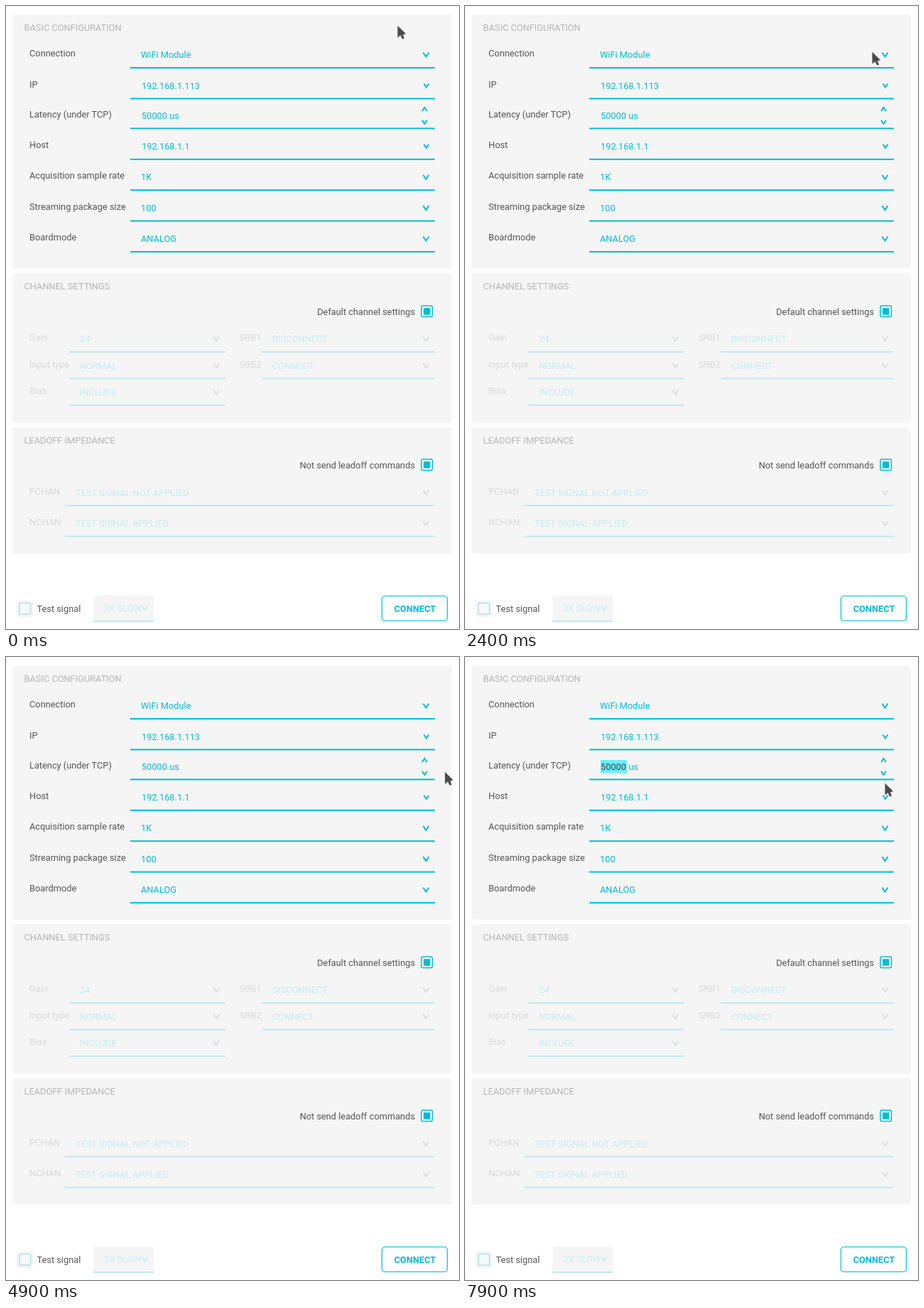
An HTML page for the animation above (8000 ms loop, 638x877 px).

```html
<!DOCTYPE html>
<html lang="en">
<head>
<meta charset="utf-8">
<title>Configuration panel</title>
<style>
html, body { margin: 0; width: 100%; height: 100%; overflow: hidden; background: #fff; }
svg { display: block; width: 638px; height: 877px; font: 12.8px Roboto, sans-serif; }
text { white-space: pre; }
</style>
</head>
<body>
<svg viewBox="0 0 638 877">
  <g id="form"></g>
  <g id="selection">
    <rect x="191" y="145" width="37" height="18" fill="#66efff"/>
    <text x="191" y="159" fill="#444">50000</text>
  </g>
  <rect id="ipCaret" x="274" y="104" width="1" height="15" fill="#00bcd4"/>
  <rect id="latencyCaret" x="192" y="146" width="1" height="17" fill="#00bcd4"/>
  <g id="connectionMenu">
    <rect x="175.5" y="9.5" width="428" height="95" fill="#f5f5f5" stroke="#dedede"/>
    <rect x="186" y="61" width="407" height="34" fill="#66efff"/>
    <path d="M193.5 78l2.5 3 5-6" fill="none" stroke="#444" stroke-width="1.8"/>
    <text x="217" y="41" fill="#555">Nelvaro (Serial)</text>
    <text x="217" y="83" fill="#444">WiFi Module</text>
  </g>
  <g id="ipMenu">
    <rect x="176" y="131" width="427" height="30" fill="#f5f5f5" stroke="#e2e2e2" stroke-width="2"/>
    <rect x="182" y="137.5" width="415" height="17.5" fill="#66efff" stroke="#3fd0e2"/>
    <text x="184" y="151" fill="#444">192.168.1.113</text>
  </g>
  <g id="pointer">
    <path d="M1 1V18L5 15 8 20 10 19 9 14 12 12Z" opacity=".12"/>
    <path d="M0 0V17L4 13.500 6.500 19 9.500 18 7.500 13 11.500 11.500Z" fill="#4a4a4a" stroke="#fff" paint-order="stroke"/>
  </g>
</svg>
<script>
const CYAN = '#00bcd4', PALE = '#c3ebf0', PALE_LINE = '#bfe9ee', PANEL = '#f5f5f5', INK = '#555';
const byId = id => document.getElementById(id);

const text = (x, y, s, fill, extra = '') =>
  `<text x="${x}" y="${Math.round(y)}" fill="${fill}" ${extra}>${s}</text>`;
const rect = (x, y, w, h, attrs) => `<rect x="${x}" y="${y}" width="${w}" height="${h}" ${attrs}/>`;
const chevron = (x, y, color, size = 1, flip = 1) =>
  `<path d="M${x - 4 * size} ${y - 3 * size * flip}l${4 * size} ${6 * size * flip} ${4 * size} ${-6 * size * flip}"
    fill="none" stroke="${color}" stroke-width="2"/>`;
const underline = (x1, x2, y, color) => rect(x1, y - 1, x2 - x1, 2, `fill="${color}"`);
const panel = (y, h, title) => rect(9, y, 619, h, `rx="4" fill="${PANEL}"`) + text(25.5, y + 23, title, '#b5b5b5');

const arrows = {
  combo: (y, color) => chevron(591.5, y, color),
  edit: (y, color) => chevron(592, y, color, .87),
  spin: (y, color) => chevron(589.5, y - 8.5, color, .87, -1) + chevron(589.5, y + 9.5, color, .87)
};

// All parts of a field hang from its underline.
function field(label, value, { labelX = 33, x1, x2 = 604, y, kind = 'combo', enabled = false }) {
  const valueX = x1 + (kind === 'combo' ? 15 : 16);
  return text(labelX, y - 15.8, label, enabled ? INK : '#d8d8d8') +
    text(valueX, y - 13.8, value, enabled ? CYAN : PALE) +
    underline(x1, x2, y, enabled ? CYAN : PALE_LINE) +
    `<g transform="translate(${x2 - 604} 0)">${arrows[kind](y - 18.5, enabled ? CYAN : '#dcdcdc')}</g>`;
}

const checkRow = (label, y) =>
  text(576, y + 4.5, label, INK, 'text-anchor="end"') +
  rect(585, y - 8, 15.5, 15.5, `rx="2" fill="#fff" stroke="${CYAN}" stroke-width="1.5"`) +
  rect(588, y - 4.8, 9.5, 9.5, `fill="${CYAN}"`);

let form = panel(12, 358, 'BASIC CONFIGURATION');
let y = 87;
[
  ['Connection', 'WiFi Module'],
  ['IP', '192.168.1.113', 'edit'],
  ['Latency (under TCP)', '50000 us', 'spin'],
  ['Host', '192.168.1.1', 'edit'],
  ['Acquisition sample rate', '1K'],
  ['Streaming package size', '100'],
  ['Boardmode', 'ANALOG']
].forEach(([label, value, kind = 'combo'], i) => {
  if (i) y += kind === 'spin' ? 42 : 43.4;
  form += field(label, value, { x1: 175, y, kind, enabled: true });
});

form += panel(376, 211, 'CHANNEL SETTINGS') + checkRow('Default channel settings', 430);
const channelY = row => 487 + 37.5 * row;
[['Gain', '24'], ['Input type', 'NORMAL'], ['Bias', 'INCLUDE']].forEach(([label, value], i) => {
  form += field(label, value, { x1: 89, x2: 309, y: channelY(i) });
});
[['SRB1', 'DISCONNECT'], ['SRB2', 'CONNECT']].forEach(([label, value], i) => {
  form += field(label, value, { labelX: 329, x1: 360, y: channelY(i) });
});

form += panel(593, 178, 'LEADOFF IMPEDANCE') + checkRow('Not send leadoff commands', 646);
[['PCHAN', 'TEST SIGNAL NOT APPLIED'], ['NCHAN', 'TEST SIGNAL APPLIED']].forEach(([label, value], i) => {
  form += field(label, value, { x1: 83, y: 703.3 + 43.4 * i });
});

form += rect(15, 837, 23, 23, 'rx="3" fill="#f4f4f4"') +
  rect(19, 840.5, 15.5, 15.5, 'rx="2" fill="#f8f8f8" stroke="#b0e2e8" stroke-width="1.5"') +
  text(43.5, 853, 'Test signal', INK) +
  rect(123, 829.5, 85, 36.5, `rx="4" fill="${PANEL}"`) +
  underline(123, 208, 866, PALE_LINE) +
  text(138, 852, '2X SLOW', '#c8edf1') +
  chevron(195.5, 847.5, '#c8edf1') +
  rect(529.5, 830.5, 92, 35, `rx="4" fill="#fff" stroke="${CYAN}" stroke-width="1.2"`) +
  text(576, 853, 'CONNECT', CYAN, 'text-anchor="middle" font-weight="700"');
byId('form').innerHTML = form;

const LOOP = 8000, TICK = 100;
const clamp = v => Math.min(1, Math.max(0, v));
// Share of a change that begins at `start` and is complete after `ticks` hard steps.
const progress = (t, start, ticks) => clamp((Math.floor((t - start) / TICK) + 1) / ticks);
const during = (t, start, end) => Number(t >= start && t < end);

const moves = [
  { start: 600, ticks: 2, to: [573, 64] },
  { start: 2900, ticks: 2, to: [584, 112] },
  { start: 3500, ticks: 2, to: [601, 104] },
  { start: 4500, ticks: 2, to: [631, 167] },
  { start: 4800, ticks: 6, to: [591, 150] },
  { start: 6900, ticks: 3, to: [591, 165] },
  { start: 7800, ticks: 2, to: [591, 177] }
];
const pointerAt = t => moves.reduce(
  (pos, { start, ticks, to }) => pos.map((v, i) => v + (to[i] - v) * progress(t, start, ticks)),
  [551, 27]
);

// The connection menu lingers at a faint level on its way in and out.
const FAINT = .24, HALF = .59;
const opacity = {
  connectionMenu: t => FAINT * (during(t, 1100, 1300) + during(t, 2200, 2400)) +
    during(t, 1300, 2100) + HALF * during(t, 2100, 2200),
  ipMenu: t => progress(t, 3900, 2) - progress(t, 4800, 2),
  ipCaret: t => during(t, 3000, 3500) + during(t, 5700, 6100),
  latencyCaret: t => during(t, 6100, 6500) + during(t, 6900, 7500),
  selection: t => during(t, 6900, LOOP)
};

const start = performance.now();
function draw() {
  const t = Math.max(0, performance.now() - start) % LOOP;
  const [x, y] = pointerAt(t);
  byId('pointer').setAttribute('transform', `translate(${x + .5} ${y + .5})`);
  for (const id in opacity) byId(id).setAttribute('opacity', opacity[id](t));
  requestAnimationFrame(draw);
}
draw();
</script>
</body>
</html>
```
